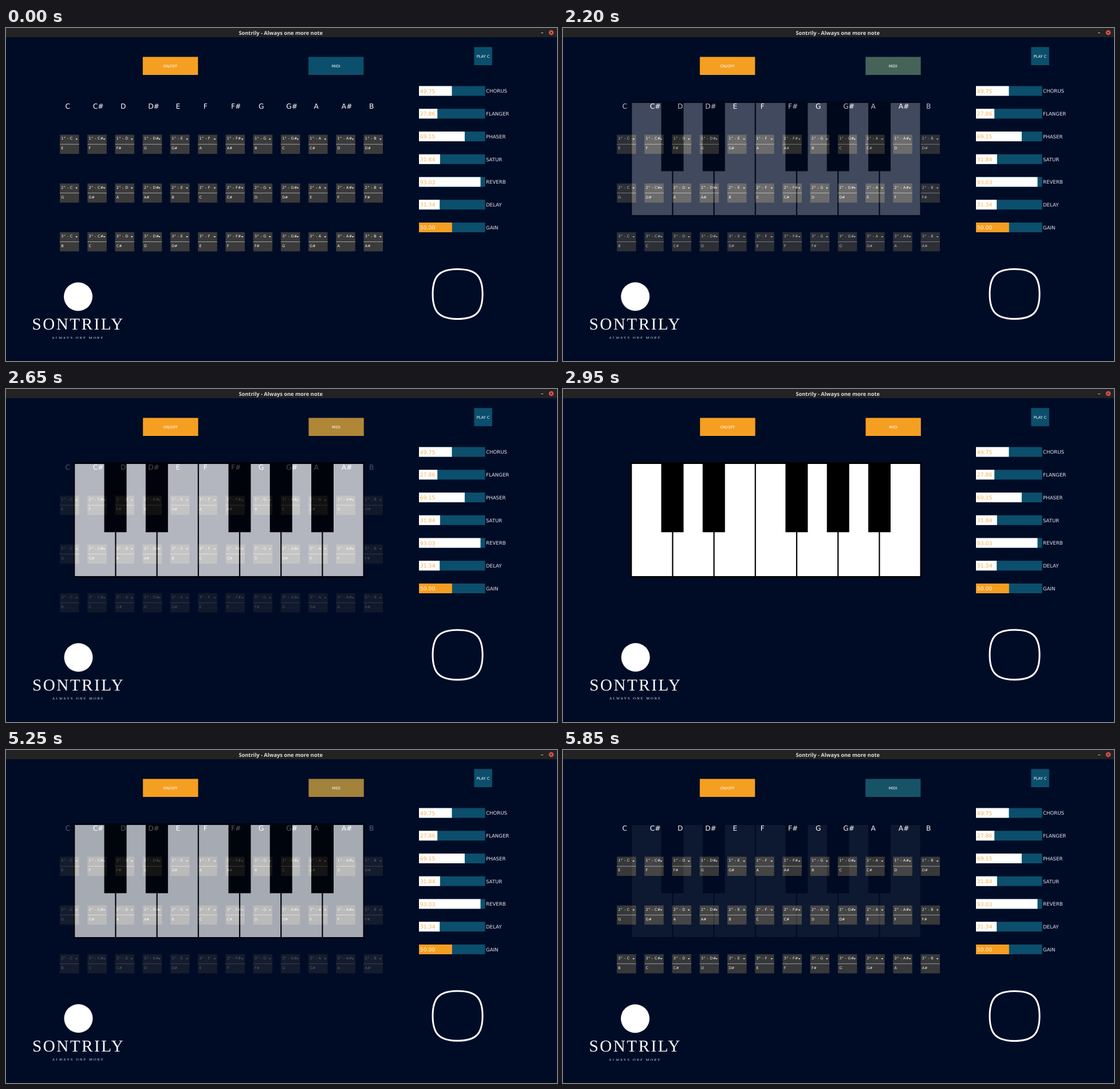
These frames come from a looping animation (962x582 px, 5.9 s). An HTML page:

```html
<!DOCTYPE html>
<html lang="en">
<head>
<meta charset="utf-8">
<title>Sontrily</title>
<style>
  html, body { margin: 0; width: 100%; height: 100%; overflow: hidden; background: #000c26; }
  svg { display: block; width: 100vw; height: 100vh; }
  text { font-family: "DejaVu Sans", sans-serif; fill: #fff; text-rendering: geometricPrecision; white-space: pre; }
  .title { font: bold 9.25px "Noto Sans", sans-serif; fill: #dedede; }
  .brand { font-family: "Liberation Serif", serif; }
</style>
</head>
<body>
<svg id="stage" viewBox="0 0 962 582"></svg>
<script>
const NOTES = ['C', 'C#', 'D', 'D#', 'E', 'F', 'F#', 'G', 'G#', 'A', 'A#', 'B'];
const EFFECTS = [['CHORUS', 49.75], ['FLANGER', 27.86], ['PHASER', 69.15], ['SATUR', 31.84],
                 ['REVERB', 93.03], ['DELAY', 31.34], ['GAIN', 50]];
const NAVY = '#000c26', TEAL = '#0b4f6c', ORANGE = '#f59f22';

const rect = (x, y, w, h, fill) => `<rect x="${x}" y="${y}" width="${w}" height="${h}" fill="${fill}"/>`;
const text = (x, y, size, content, attrs = '') =>
  `<text x="${x}" y="${y}" font-size="${size}" ${attrs}>${content}</text>`;
const shift = (x, y, content) => `<g transform="translate(${x} ${y})">${content}</g>`;
const MIDDLE = 'text-anchor="middle"';

const button = (x, y, w, h, label, fill) =>
  rect(x, y, w, h, fill) + text(x + w / 2, y + h / 2 + 2.4, 6.6, label, MIDDLE);

const titleBar = () => rect(0, 0, 962, 16, '#232323') +
  `<text class="title" x="479.7" y="11.8" ${MIDDLE}>Sontrily - Always one more note</text>` +
  rect(934, 8, 4, 1, '#bbb') +
  '<circle cx="952" cy="8" r="4.3" fill="#d9504c"/>' +
  '<path d="M950.5 6.5l3 3m0-3l-3 3" stroke="#331c1c"/>';

const slider = ([label, value], i) => {
  const y = 101.5 + 39.75 * i, gain = label === 'GAIN';
  return rect(721, y, 115.5, 17, TEAL) +
    rect(721, y, 1.155 * value, 17, gain ? ORANGE : '#fff') +
    text(722.8, y + 12, 9.3, value.toFixed(2), `style="fill:${gain ? '#fff0d8' : '#f8b253'}"`) +
    text(838, y + 11.8, 8.6, label, 'style="fill:#e4e6ea"');
};

const logo = () => '<circle cx="126" cy="469.5" r="25" fill="#fff"/>' +
  text(45.5, 527, 29, 'SONTRILY', 'class="brand" letter-spacing="2.6"') +
  '<clipPath id="cut"><rect x="40" y="530" width="180" height="13"/></clipPath>' +
  text(80, 543.8, 6.5, 'ALWAYS ONE MORE', 'class="brand" letter-spacing="2" clip-path="url(#cut)"');

const knob = () => {
  const r = 43.5, k = r * 0.73;
  return shift(788.5, 465, `<path d="M${-r} 0C${-r} ${-k} ${-k} ${-r} 0 ${-r}S${r} ${-k} ${r} 0 ` +
    `${k} ${r} 0 ${r}S${-r} ${k} ${-r} 0Z" fill="none" stroke="#fff" stroke-width="3"/>`);
};

const cell = (x, y, degree, root, note) =>
  rect(x, y, 33.5, 33.5, '#3b3b3b') + rect(x, y + 16.2, 33.5, 1, '#a0a0a0') +
  text(x + 2.3, y + 8.9, 6.3, `${degree}° - ${root}`, 'letter-spacing=".4"') +
  text(x + 2.3, y + 25.9, 6.3, note) +
  `<path d="M${x + 27.2} ${y + 7}h4l-2 2z" fill="#fff"/>`;

const chordGrid = () => NOTES.map((root, i) => {
  const x = 94 + 48.23 * i;
  return text(x + 9.5, 141.4, 12.2, root) + [4, 7, 11].map((interval, row) =>
    cell(x, 186.5 + 85.2 * row, row + 1, root, NOTES[(i + interval) % 12])).join('');
}).join('');

const piano = () => rect(117.5, 128, 508.5, 201.5, '#000') +
  [0, 1, 2, 3, 4, 5, 6].map(i => rect(120.3 + 72.2 * i, 131, 70, 196, '#fff')).join('') +
  [0, 1, 3, 4, 5].map(i => rect(171.5 + 72.3 * i, 128, 39, 122.3, '#000')).join('');

// The keyboard view sits a fraction of a pixel off the chord view.
const scene = (midi, content, [dx, dy]) => rect(0, 0, 962, 582, NAVY) + titleBar() +
  shift(dx * 0.6, 0, button(238.8, 50.5, 96.4, 31.5, 'ON/OFF', ORANGE) +
    button(528, 50.5, 96.4, 31.5, 'MIDI', midi)) +
  button(817.3, 33.3, 31.5, 31.7, 'PLAY C', TEAL) +
  EFFECTS.map(slider).join('') + shift(dx, dy, logo()) + shift(0, dy, knob()) + content;

document.getElementById('stage').innerHTML = scene(TEAL, chordGrid(), [0, 0]) +
  `<g id="keys">${scene(ORANGE, piano(), [0.7, -0.5])}</g>`;
const keys = document.getElementById('keys');

// Twenty 50 ms steps of 5% each way, with a hold on either view.
const fadeStep = (t, start) => Math.min(1, Math.max(0, (Math.floor((t - start) / 50) + 1) / 20));

function draw() {
  const t = performance.now() % 5900;
  keys.setAttribute('opacity', fadeStep(t, 2000) - fadeStep(t, 4950));
  requestAnimationFrame(draw);
}
draw();
</script>
</body>
</html>
```
